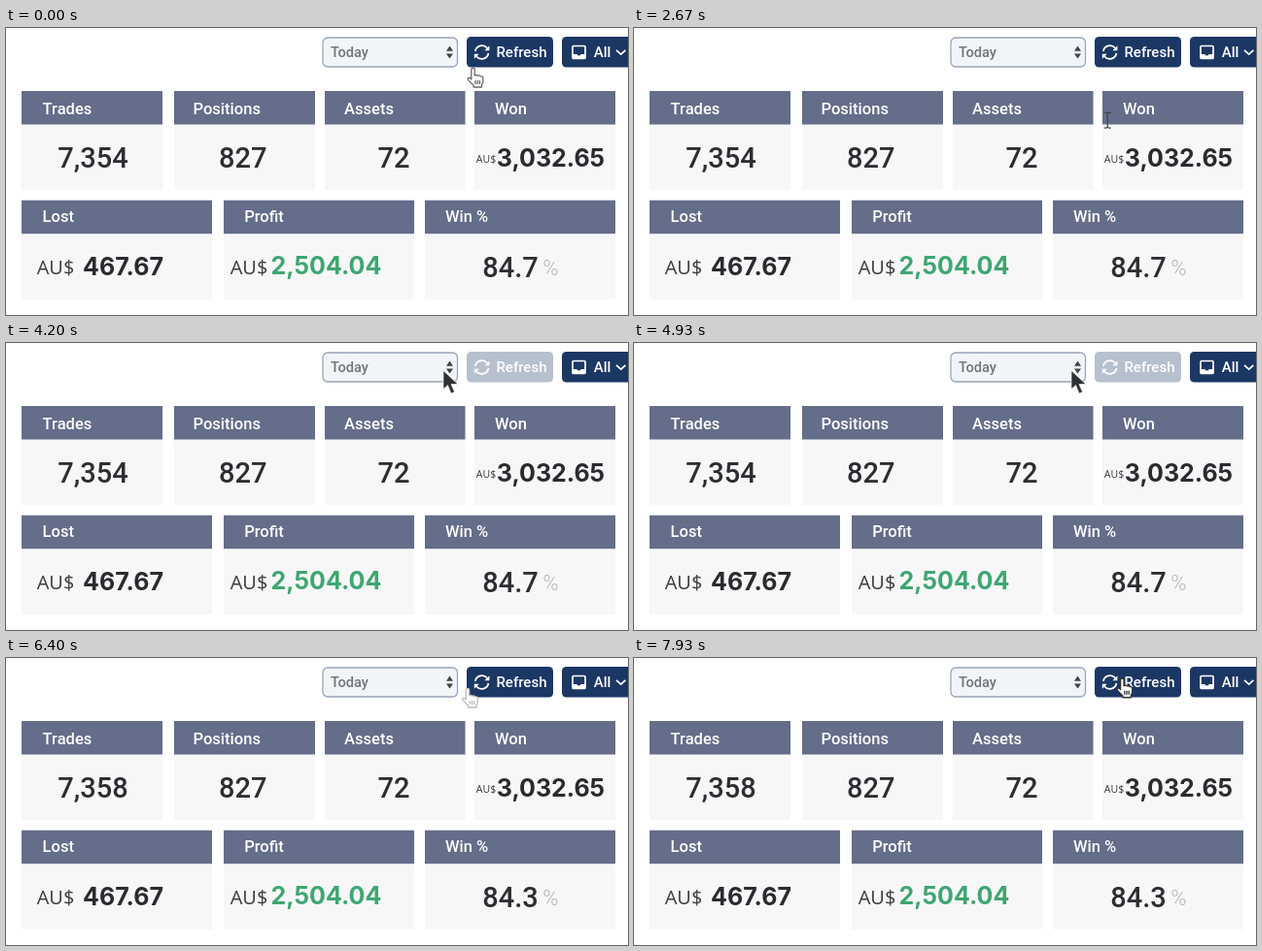
An HTML page that plays this animation: 640x296 px, repeating every 8 s.

```html
<!DOCTYPE html>
<html lang="en">
<head>
<meta charset="utf-8">
<title>Trading summary</title>
<style>
  html, body { margin: 0; width: 100%; height: 100%; overflow: hidden; background: #fff; }
  svg { display: block; width: 640px; height: 296px; }
  text { font-family: Roboto, sans-serif; font-weight: 500; }
  .head { font-size: 16.5px; fill: #fff; }
  .count { font-size: 29px; fill: #2d2e33; text-anchor: middle; }
  .money { font: 700 25px Inter, sans-serif; fill: #2a2b30; text-anchor: middle; }
  .unit { font: 400 20px "Open Sans", sans-serif; fill: #3b3c40; text-anchor: middle; }
  .small { font-size: 10.5px; }
  .gain { fill: #3fa672; }
  .percent { font-size: 22px; font-weight: 300; fill: #b4b4b4; text-anchor: middle; }
  .label { font-size: 15px; fill: #fff; }
  .line { fill: none; stroke: #fff; stroke-width: 1.7; }
</style>
</head>
<body>
<svg viewBox="0 0 640 296">
  <g id="cards"></g>

  <rect x="326" y="10" width="138.5" height="30" rx="5" fill="#f1f5f9" stroke="#98a5b9" stroke-width="1.3"/>
  <text x="334" y="30" font-size="14.6" fill="#72757c">Today</text>
  <path d="M453 23.8 456.5 18.5 460 23.8ZM453 26.4H460L456.5 31.6Z" fill="#3f4248"/>

  <g id="refresh">
    <rect x="474" y="9" width="89" height="31.5" rx="4.5" fill="#1b3764"/>
    <path class="line" d="M482.8 24A7 7 0 0 1 495.2 20.8M496.4 26A7 7 0 0 1 484 29.2"/>
    <path d="M497.4 18.3V23.3H492.4ZM481.8 31.7V26.7H486.8Z" fill="#fff"/>
    <text class="label" x="504.5" y="30.3">Refresh</text>
  </g>

  <rect x="572" y="9" width="90" height="31.5" rx="4.5" fill="#1b3764"/>
  <rect class="line" x="583" y="18.5" width="13" height="13" rx="1"/>
  <path d="M583 27H587.2Q589.5 30 591.8 27H596V31.5H583Z" fill="#fff"/>
  <text class="label" x="604.8" y="30.3">All</text>
  <path class="line" d="M628 22.8 632.7 27.2 637.4 22.8"/>

  <g id="hand">
    <path transform="translate(-6.9)" fill="#fff" stroke-width="1.3" stroke-linejoin="round"
      d="M5.2 12V2a1.7 1.7 0 0 1 3.4 0V8q1.6-1.4 3 .3 1.8-1 2.9.6 2.6-.6 2.8 1.8V14q0 2-1.4 3.4V20H7.5V18.3L2 12.6q-1-2 .8-2.4 1.2 0 2.4 1.8ZM9.4 13V17M11.6 13V17M13.8 13V17"/>
  </g>
  <path id="beam" d="M-3.5-8Q0-8 0-6.5 0-8 3.5-8M0-6.5V6.5M-3.5 8Q0 8 0 6.5 0 8 3.5 8" fill="none" stroke="#444" stroke-width="1.2"/>
  <path id="arrow" d="M0 0V19L4.5 15 8 23.5 11.5 22 8 14H15Z" fill="#2f3033" stroke="#fff" stroke-width=".6"/>
</svg>
<script>
const LOOP = 8000, STEP = 1000 / 15;
const find = id => document.getElementById(id);
const text = (cls, x, y, value, id = '') => `<text class="${cls}" x="${x}" y="${y}" id="${id}">${value}</text>`;

const card = (title, x, y, width, titleX) =>
  `<rect x="${x}" y="${y}" width="${width}" height="102" fill="#f7f7f7"/>
   <rect x="${x}" y="${y}" width="${width}" height="34.5" fill="#646d89"/>` +
  text('head', titleX, y + (y < 100 ? 24 : 22.5), title);

find('cards').innerHTML = [
  card('Trades', 16, 65, 145, 37.6),
  card('Positions', 173, 65, 145, 192.5),
  card('Assets', 328, 65, 144.5, 348),
  card('Won', 482, 65, 145, 503),
  card('Lost', 16, 177.7, 196, 37.6),
  card('Profit', 224, 177.7, 196, 245.3),
  card('Win %', 431, 177.7, 196, 452),
  text('count', 89.5, 144, '', 'trades'),
  text('count', 243.8, 144, '827'),
  text('count', 399, 144, '72'),
  text('unit small', 494, 138.5, 'AU$'),
  text('money', 560.5, 143, '3,032.65'),
  text('unit', 51, 253.5, 'AU$'),
  text('money', 120.5, 255, '467.67'),
  text('unit', 250, 253.5, 'AU$'),
  text('money gain', 329.5, 254, '2,504.04'),
  text('count', 519, 256.5, '', 'rate'),
  text('percent', 560.5, 254.5, '%')
].join('');

// Pointer route: time, x, y, shape, outline grey (hand only)
const route = [
  [0, 480.5, 41, 'hand', 105],
  [800, 480.5, 41, 'hand', 105],
  [1070, 485, 33, 'hand', 80],
  [1330, 476, 47, 'hand', 105],
  [1390, 471, 56, 'beam'],
  [1600, 459, 68.5, 'beam'],
  [1930, 454, 74, 'beam'],
  [2200, 462, 58, 'beam'],
  [2470, 477, 72, 'beam'],
  [2930, 503, 131, 'beam'],
  [3130, 492, 70, 'beam'],
  [3190, 486, 44, 'hand', 105],
  [3330, 480.5, 41, 'hand', 105],
  [3860, 480.5, 41, 'hand', 105],
  [3930, 468, 36, 'arrow'],
  [4200, 450, 28.5, 'arrow'],
  [4990, 450, 28.5, 'arrow'],
  [5060, 470, 36, 'hand', 105],
  [5200, 480.5, 41, 'hand', 105],
  [5400, 480.5, 41, 'hand', 105],
  [5730, 495, 29, 'hand', 70],
  [6070, 460, 27, 'hand', 130],
  [6400, 475, 31, 'hand', 190],
  [6670, 468, 28, 'hand', 150],
  [7000, 461, 26, 'hand', 110],
  [7470, 490, 25, 'hand', 70],
  [7930, 503, 20.5, 'hand', 50],
  [8000, 503, 20.5, 'hand', 50]
];

const clamp = v => Math.max(0, Math.min(1, v));
const ease = v => v * v * (3 - 2 * v);
const mix = (a, b, k) => a + (b - a) * k;

function drawPointer(t) {
  const i = Math.max(0, route.findLastIndex(p => p[0] <= t));
  const a = route[i], b = route[i + 1] || a;
  const k = b === a ? 0 : ease(clamp((t - a[0]) / (b[0] - a[0])));
  for (const shape of ['hand', 'beam', 'arrow']) {
    const node = find(shape);
    node.style.display = shape === a[3] ? '' : 'none';
    node.setAttribute('transform', `translate(${mix(a[1], b[1], k)} ${mix(a[2], b[2], k)})`);
  }
  const grey = Math.round(mix(a[4] ?? 105, b[4] ?? 105, k));
  find('hand').setAttribute('stroke', `rgb(${grey},${grey},${grey})`);
}

function draw(now) {
  const t = Math.floor((now % LOOP + 1) / STEP) * STEP;
  const updated = t >= 4990;
  find('trades').textContent = updated ? '7,358' : '7,354';
  find('rate').textContent = updated ? '84.3' : '84.7';
  const busy = clamp((t - 3800) / 330) - clamp((t - 4935) / 200);
  find('refresh').setAttribute('opacity', 1 - 0.69 * busy);
  drawPointer(t);
}

const start = performance.now();
function tick() {
  draw(performance.now() - start);
  requestAnimationFrame(tick);
}
tick();
</script>
</body>
</html>
```
